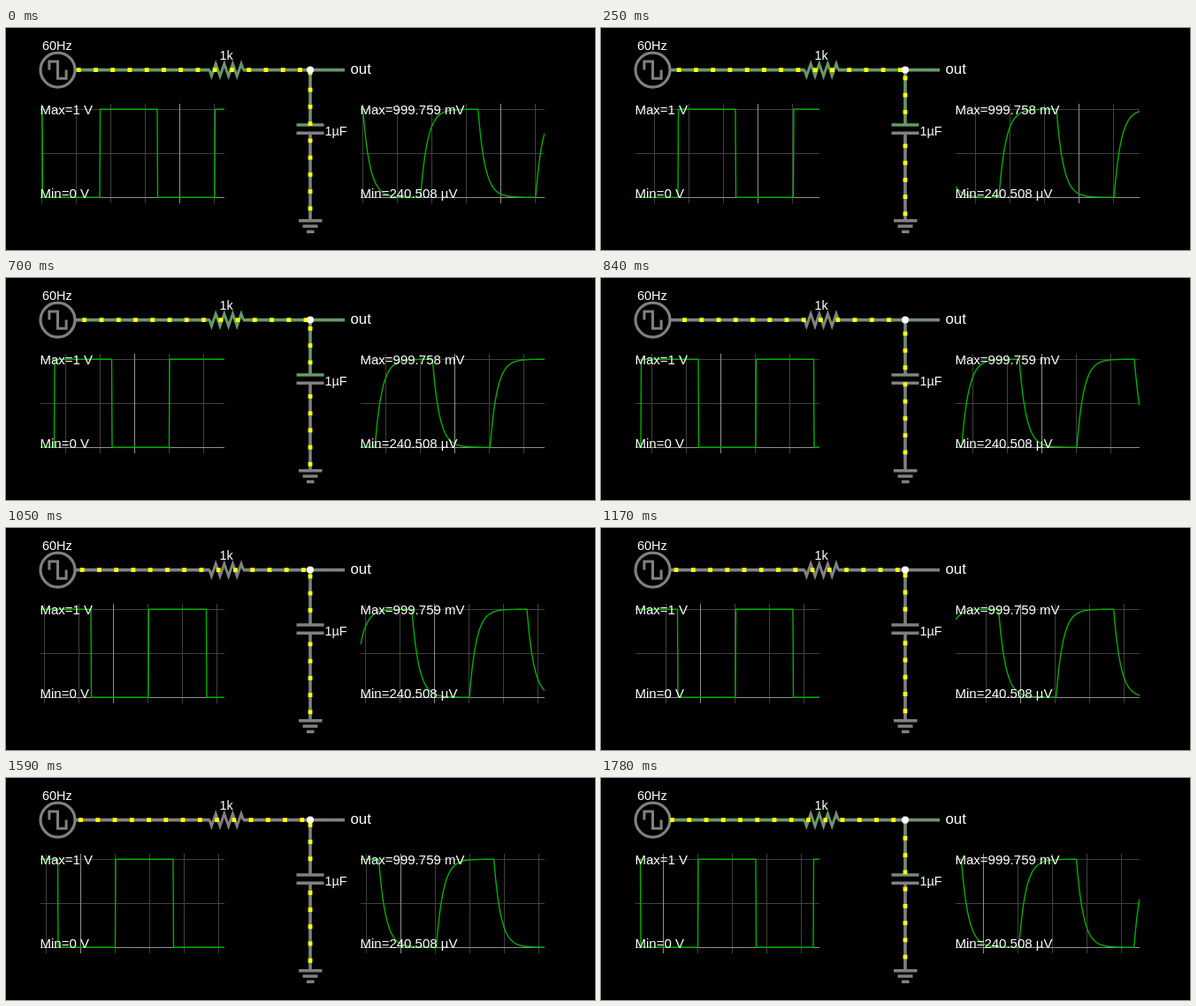
An HTML page that plays this animation: 666x252 px, repeating every 1850 ms.

```html
<!DOCTYPE html>
<html lang="en">
<head>
<meta charset="utf-8">
<title>RC low-pass filter</title>
<style>
  html, body { margin: 0; width: 100%; height: 100%; overflow: hidden; background: #000; }
  svg { display: block; }
  text { fill: #fff; font: 14.4px "Liberation Sans", Arial, sans-serif; }
  .thick { fill: none; stroke: #808080; stroke-width: 3.6; }
  .scope { fill: none; stroke-width: 1; }
  .scope text { font-size: 15px; stroke: none; }
  .minor { stroke: #404040; }
  .major { stroke: #909090; }
  .wave { stroke: #00b000; stroke-width: 1.4; }
</style>
</head>
<body>
<svg width="666" height="252" viewBox="0 0 666 252">
  <defs>
    <linearGradient id="drop" gradientUnits="userSpaceOnUse" x1="230" y1="0" x2="268.4" y2="0">
      <stop id="dropStart"/><stop id="dropEnd" offset="1"/>
    </linearGradient>
    <clipPath id="window"><rect x="38.5" y="80" width="208.5" height="125"/></clipPath>
  </defs>
  <g class="thick">
    <circle cx="58.5" cy="47.6" r="19.5" stroke-width="3.2"/>
    <path d="M48.9 47.6V38H58.5V57.2H68.1V47.6" stroke-width="3"/>
    <path id="inWire" d="M79 47.6H230.5"/>
    <path id="resistor" stroke="url(#drop)" stroke-width="3" stroke-miterlimit="10"/>
    <path id="outWire" d="M268 47.6H383M344 47.6V110M328.5 110H359.5"/>
    <path d="M328.5 119.3H359.5M344 119.3V218.5M331 218.7H357.5M335.5 225H352.5M340 231.2H348.5"/>
  </g>
  <path id="dots" fill="#ff0"/>
  <circle cx="344" cy="47.6" r="4" fill="#fff"/>
  <text x="41" y="25">60Hz</text>
  <text x="241.5" y="36">1k</text>
  <text x="360.5" y="122">1µF</text>
  <text x="389.5" y="52" style="font-size:16.8px">out</text>
  <g class="scope" id="source"></g>
  <g class="scope" id="output" transform="translate(362)"></g>
</svg>
<script>
const $ = id => document.getElementById(id);

// Display time of each simulation step, in milliseconds.
const holds = [..."7666676767677777668777677667"].map(d => d * 10);
const loop = holds.reduce((a, b) => a + b);

const left = 39, right = 247, high = 92, low = 192, wireY = 47.6;
const half = 65.1, period = 2 * half, tau = 7.8, stepWidth = 4.68;
const division = 39, firstEdge = 236.3;
const spacing = 19.25, maxJump = spacing / 2;

// Distance is measured from a rising edge of the square wave.
const wrap = (n, size) => (n % size + size) % size;
const square = d => wrap(d, period) < half ? 1 : 0;
function charge(d) {
  const c = wrap(d, period);
  return c < half ? 1 - Math.exp(-c / tau) : Math.exp((half - c) / tau);
}

// Each step moves the charge dots by the momentary current.
const dotShift = [3.2];
for (let i = 1; i < holds.length; i++) {
  const d = right - firstEdge + i * stepWidth;
  const current = square(d) - charge(d);
  const gain = current > 0 ? 21.2 : 18.7;
  dotShift.push(dotShift[i - 1] + current * gain % maxJump);
}

function voltColor(v) {
  const dim = Math.round(128 - 26 * v), green = Math.round(128 + 25 * v);
  return `rgb(${dim},${green},${dim})`;
}

function setupScope(id, max, min) {
  $(id).innerHTML = `<g clip-path="url(#window)">
    <path class="minor" d="M${left} 92.5H${right}M${left} 142.5H${right}"/>
    <path class="minor" data-part="grid"/>
    <path class="major" data-part="zero"/>
    <path class="wave" data-part="wave"/></g>
    <text x="38.5" y="98" data-part="max">${max}</text>
    <text x="38.5" y="193">${min}</text>`;
}
const part = (id, name) => $(id).querySelector(`[data-part=${name}]`);

function drawScope(id, edge, signal) {
  const major = Math.round(edge - 40.3) + 0.5;
  let grid = "", wave = "";
  for (let k = -6; k <= 6; k++) {
    if (k) grid += `M${major + k * division} 86V199`;
  }
  for (let x = left; x <= right; x += 0.5) {
    const y = low + 0.2 - (low - high) * signal(x - edge);
    wave += `${wave ? "L" : "M"}${x} ${y.toFixed(2)}`;
  }
  part(id, "grid").setAttribute("d", grid);
  part(id, "zero").setAttribute("d", `M${left} 192.5H${right}M${major} 86V199`);
  part(id, "wave").setAttribute("d", wave);
}

function dotsAlong(from, to, origin, shift, place) {
  let d = "";
  for (let p = origin + wrap(shift, spacing) - spacing; p < to; p += spacing) {
    if (p >= from) {
      const [x, y] = place(p);
      d += `M${(x - 2.4).toFixed(2)} ${(y - 2.4).toFixed(2)}h4.8v4.8h-4.8z`;
    }
  }
  return d;
}

function draw(time) {
  let step = 0, rest = time % loop;
  while (rest >= holds[step]) rest -= holds[step++];

  const edge = firstEdge - step * stepWidth;
  drawScope("source", edge, square);
  drawScope("output", edge + 0.6, charge);
  part("output", "max").textContent = `Max=999.75${step > 0 && step < 12 ? 8 : 9} mV`;

  const inColor = voltColor(square(right - edge));
  const outColor = voltColor(charge(right - edge));
  $("inWire").style.stroke = inColor;
  $("outWire").style.stroke = outColor;
  $("dropStart").setAttribute("stop-color", inColor);
  $("dropEnd").setAttribute("stop-color", outColor);

  const shift = dotShift[step];
  const down = p => [344, p];
  $("dots").setAttribute("d",
    dotsAlong(79, 343, 79, shift, p => [p, wireY]) +
    dotsAlong(48, 110, 47.7, shift, down) +
    dotsAlong(119, 217, 124.7, shift, down));
}

let zigzag = `M230 ${wireY}`;
for (let i = 0; i < 8; i++) {
  zigzag += `L${230 + 2.4 * (2 * i + 1)} ${wireY + (i % 2 ? -7 : 7)}`;
}
$("resistor").setAttribute("d", `${zigzag}L268.4 ${wireY}`);
setupScope("source", "Max=1 V", "Min=0 V");
setupScope("output", "Max=999.759 mV", "Min=240.508 µV");

const start = performance.now();
function tick() {
  draw(performance.now() - start);
  requestAnimationFrame(tick);
}
tick();
</script>
</body>
</html>
```
